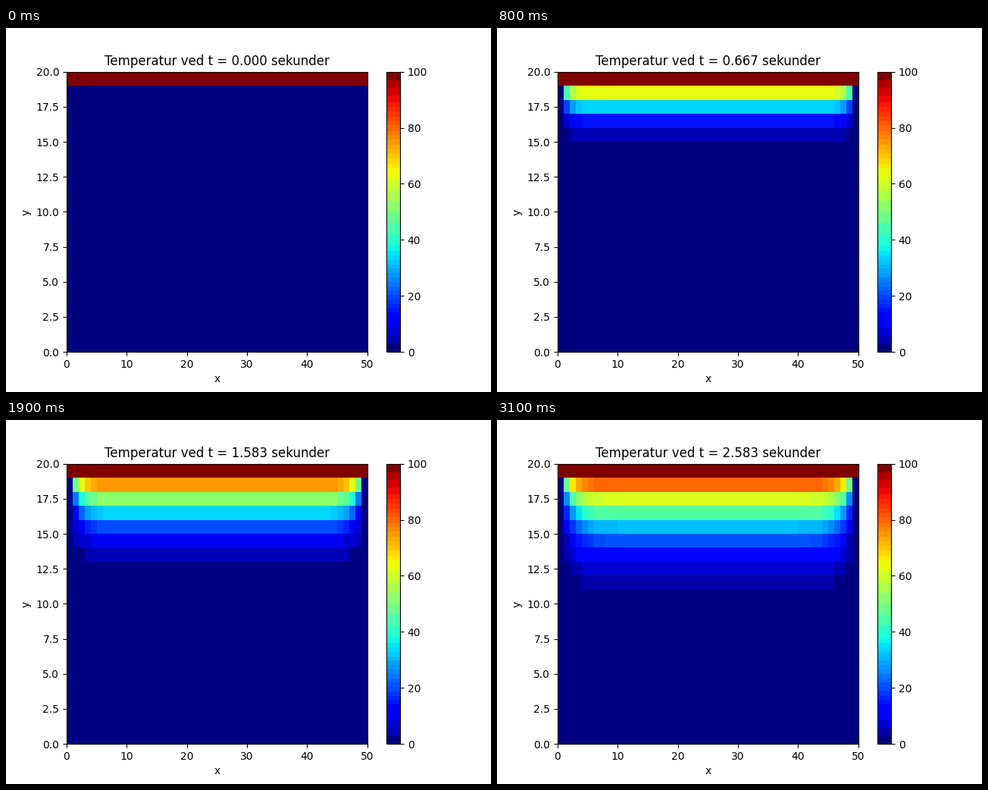
Recreate the animation shown at these times as a matplotlib script. Size 640x480 px, loop 3.2 s.

```python
import matplotlib.pyplot as plt
import numpy as np
from matplotlib.animation import FuncAnimation
from matplotlib.colors import ListedColormap

ROWS, COLS = 20, 50
FRAMES, INTERVAL = 32, 100
ALPHA = 3.0
DT = 1 / (4 * ALPHA)

# on-screen area in pixels of one plate cell and of one colorbar level
CELL_AREA, LEVEL_AREA = 147, 26

JET = np.floor(plt.get_cmap("jet")(np.arange(256))[:, :3] * 255 + 0.5).astype(int)
# colour bands: 3 bits of red, 4 of green, 3 of blue
BAND = (JET[:, 0] >> 5) * 128 + (JET[:, 1] >> 4) * 8 + (JET[:, 2] >> 5)


def solve():
    """Explicit heat equation with a hot top edge and cold other edges."""
    plates = np.zeros((FRAMES, ROWS, COLS))
    plates[:, -1, :] = 100
    for k in range(FRAMES - 1):
        u = plates[k]
        around = u[2:, 1:-1] + u[:-2, 1:-1] + u[1:-1, 2:] + u[1:-1, :-2]
        plates[k + 1, 1:-1, 1:-1] = (
            u[1:-1, 1:-1] + ALPHA * DT * (around - 4 * u[1:-1, 1:-1])
        )
    return plates


def banded_jet(plate):
    """Jet in flat bands, each the area-weighted mean of its visible colours."""
    levels = np.minimum((plate * 2.56).astype(int), 255).ravel()
    area = LEVEL_AREA + CELL_AREA * np.bincount(levels, minlength=256)
    colors = np.zeros((256, 3))
    for band in np.unique(BAND):
        pick = BAND == band
        colors[pick] = np.floor(np.average(JET[pick], axis=0, weights=area[pick]) + 1e-9)
    return ListedColormap(colors / 255)


plates = solve()
cmaps = [banded_jet(p) for p in plates]

fig, ax = plt.subplots(figsize=(6.4, 4.8), dpi=100)
mesh = ax.pcolormesh(plates[0], cmap=cmaps[0], vmin=0, vmax=100)
fig.colorbar(mesh, ax=ax)
ax.set_xlabel("x")
ax.set_ylabel("y")
title = ax.set_title("")


def draw(k):
    mesh.set_array(plates[k])
    mesh.set_cmap(cmaps[k])
    title.set_text(f"Temperatur ved t = {k * DT:.3f} sekunder")
    return mesh, title


anim = FuncAnimation(fig, draw, frames=FRAMES, interval=INTERVAL,
                     repeat=True, repeat_delay=0, blit=False)
plt.show()
```
